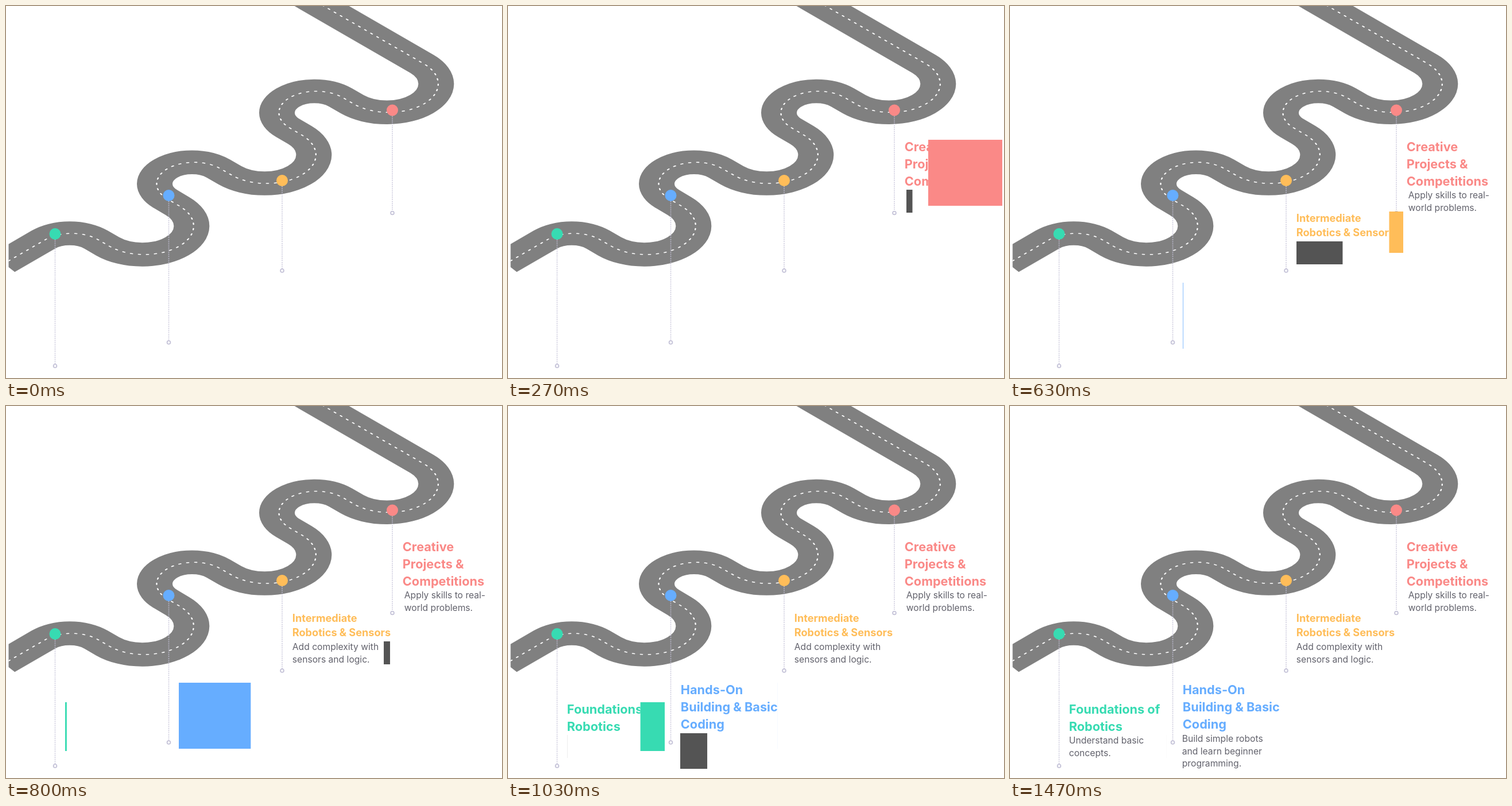
Recreate the animation shown at these times as an HTML page. Size 864x648 px, loop 5010 ms.

```html
<!DOCTYPE html>
<html lang="en">
<head>
<meta charset="utf-8">
<title>Learning roadmap</title>
<style>
  html, body { margin: 0; width: 100%; height: 100%; overflow: hidden; background: #fff; }
  svg { display: block; width: 864px; height: 648px; }
  text { font-family: Inter, "Open Sans", sans-serif; font-optical-sizing: none; white-space: pre; }
  .road path { fill: none; }
  .asphalt { stroke: #808080; stroke-width: 62; }
  .dashes { stroke: #fff; stroke-width: 2.3; stroke-linecap: round; stroke-dasharray: 3.5 10.5; transform: translateX(3.5px); }
  .stem { stroke: #c1bfd5; stroke-width: 1.6; stroke-dasharray: 1.5 1.8; }
  .ring { fill: #fff; stroke: #c5c3d8; stroke-width: 1.8; }
</style>
</head>
<body>
<svg id="stage" viewBox="0 0 864 648">
  <defs><clipPath id="edge"><rect x="4.5" width="860" height="648"/></clipPath></defs>
  <g clip-path="url(#edge)">
    <g id="road" class="road" transform="scale(1 .67)"></g>
  </g>
  <g id="pins"></g>
  <g id="labels"></g>
</svg>
<script>
const LOOP = 5010, STAGGER = 142, PHASE = 250;
const RED = '#fa8987', ORANGE = '#ffbd59', BLUE = '#66adff', GREEN = '#37dbb2', DARK = '#545454';
const $ = id => document.getElementById(id);

function add(parent, tag, attrs, content) {
  const el = document.createElementNS('http://www.w3.org/2000/svg', tag);
  for (const key in attrs) el.setAttribute(key, attrs[key]);
  if (content) el.textContent = content;
  parent.appendChild(el);
  return el;
}

// The road is an even stroke, flattened vertically: half ellipses joined by straights.
const sweep = 'a86 74.1 0 0 1-121.6 104.8l-20.2-17.4';
const hook = 'a65 56 0 0 0-92 79.2l20.8 18.2';
const route = 'M515.3-29.9L724.8 150.6' + (sweep + hook).repeat(2) + sweep +
  'a65 56 0 0 0-92 0l-70 60.3';
for (const name of ['asphalt', 'dashes']) add($('road'), 'path', { class: name, d: route });

// x, dot y, ring y, colour
const pins = [
  [85.5, 397, 627, GREEN],
  [283.5, 330, 586, BLUE],
  [481, 304, 461, ORANGE],
  [673, 181.5, 360.5, RED]
];
for (const [x, top, foot, color] of pins) {
  add($('pins'), 'line', { class: 'stem', x1: x, x2: x, y1: top, y2: foot - 4 });
  add($('pins'), 'circle', { class: 'ring', cx: x, cy: foot, r: 2.9 });
  add($('pins'), 'circle', { cx: x, cy: top, r: 10, fill: color });
}

const heading = { size: 21.7, weight: 700, lead: 29.9, drop: 20.2 };
const subhead = { size: 18.15, weight: 700, lead: 25.5, drop: 17.5 };
const body = { size: 15.65, weight: 400, lead: 21.3, drop: 15.4, ink: '#62626c' };

// Listed in the order they appear.
const labels = [
  [heading, RED, 691, 233, 170, 115, ['Creative', 'Projects &', 'Competitions']],
  [body, DARK, 694, 320, 170, 40, ['Apply skills to real-', 'world problems.']],
  [subhead, ORANGE, 499, 358, 186, 72, ['Intermediate', 'Robotics & Sensors']],
  [body, DARK, 499, 410, 170, 40, ['Add complexity with', 'sensors and logic.']],
  [heading, BLUE, 301, 482, 169, 115, ['Hands-On', 'Building & Basic', 'Coding']],
  [heading, GREEN, 103, 516, 170, 85, ['Foundations of', 'Robotics']],
  [body, DARK, 300, 570, 170, 62, ['Build simple robots', 'and learn beginner', 'programming.']],
  [body, DARK, 103, 573, 170, 40, ['Understand basic', 'concepts.']]
].map(([style, color, x, y, width, height, lines], i) => {
  const clip = add($('labels'), 'clipPath', { id: 'clip' + i });
  const mask = add(clip, 'rect', { width: 0, height: 648 });
  const group = add($('labels'), 'g', {
    'clip-path': `url(#clip${i})`, fill: style.ink || color,
    'font-size': style.size, 'font-weight': style.weight
  });
  lines.forEach((line, n) =>
    add(group, 'text', { x: x - 0.2, y: y + style.drop + n * style.lead }, line));
  const block = add($('labels'), 'rect', { x, y, width: 0, height, fill: color });
  return { x, width, mask, block, start: i * STAGGER };
});

const clamp = v => Math.min(1, Math.max(0, v));

// A block grows from the left, then withdraws to the right and uncovers its text.
function draw(time) {
  for (const { x, width, mask, block, start } of labels) {
    const p = (time - start) / PHASE;
    const grown = clamp(p) ** 4;
    const gone = 1 - (1 - clamp(p - 1)) ** 4;
    const left = x + width * gone;
    block.setAttribute('x', left);
    block.setAttribute('width', Math.max(0, width * (grown - gone)));
    mask.setAttribute('width', p <= 1 ? 0 : p >= 2 ? 864 : left);
  }
}

const begin = performance.now();
function tick() {
  const t = (performance.now() - begin) % LOOP;
  // thirty pictures a second, timed in hundredths
  const step = Math.floor((Math.floor(t / 10) + 0.5) * 0.3);
  draw(step * 1000 / 30);
  requestAnimationFrame(tick);
}
tick();
</script>
</body>
</html>
```
